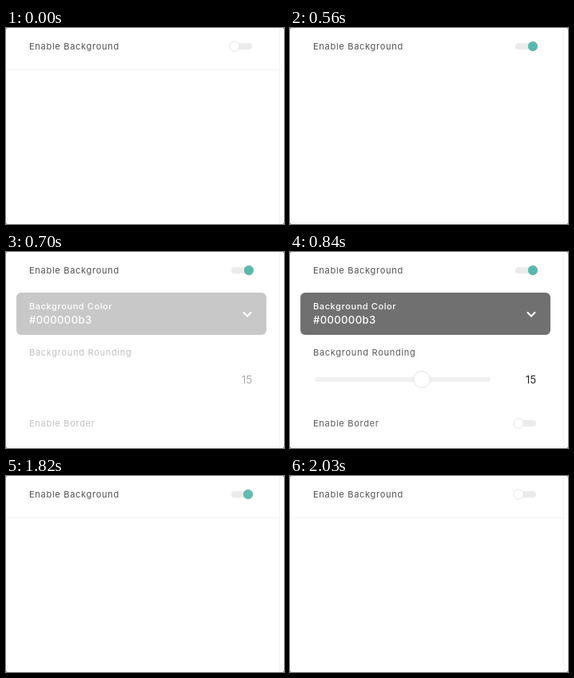
These frames come from a looping animation (348x246 px, 2.38 s). An HTML page with a canvas:

```html
<!DOCTYPE html>
<html lang="en">
<head>
<meta charset="utf-8">
<title>Background settings</title>
<style>
  html, body { margin: 0; width: 100%; height: 100%; overflow: hidden; background: #fff; }
  canvas { display: block; width: 348px; height: 246px; }
</style>
</head>
<body>
<canvas id="stage"></canvas>
<script>
const W = 348, H = 246, LOOP = 2380, TICK = 70;
const OPEN = 420, FADE = 700, CLOSE = 1820;
const TRACK = '#ebebeb', RULE = '#f3f3f3';

const canvas = document.getElementById('stage');
const ctx = canvas.getContext('2d');
const dpr = window.devicePixelRatio || 1;
canvas.width = W * dpr;
canvas.height = H * dpr;
ctx.scale(dpr, dpr);

const mix = (a, b, k) => a + (b - a) * k;
const blend = (a, b, k) => `rgb(${a.map((v, i) => Math.round(mix(v, b[i], k))).join(',')})`;

// Value for each tick after a start time; the last one holds.
const step = (t, start, values) =>
  values[Math.min(values.length - 1, Math.floor((t - start) / TICK))];

function label(str, x, y, { size = 11, weight = 400, color = '#505050', spacing = 0.72, align = 'left' } = {}) {
  ctx.font = `${weight} ${size}px Inter, "Open Sans", sans-serif`;
  ctx.letterSpacing = spacing + 'px';
  ctx.textAlign = align;
  ctx.fillStyle = color;
  ctx.fillText(str, x, y);
}

function box(x, y, w, h, r, fill) {
  ctx.beginPath();
  ctx.roundRect(x, y, w, h, r);
  ctx.fillStyle = fill;
  ctx.fill();
}

function knob(x, y, r, fill, edge) {
  ctx.beginPath();
  ctx.arc(x, y, r, 0, Math.PI * 2);
  ctx.fillStyle = fill;
  ctx.fill();
  ctx.strokeStyle = edge;
  ctx.lineWidth = 0.9;
  ctx.stroke();
}

function toggle(y, on) {
  box(282, y - 4, 26, 8, 4, TRACK);
  knob(mix(286, 304, on), y, mix(6.2, 5.7, on),
    blend([255, 255, 255], [90, 185, 173], on),
    blend([226, 226, 226], [102, 178, 169], on));
}

function switchState(t) {
  if (t < OPEN) return 0;
  if (t < CLOSE) return step(t, OPEN, [0.06, 0.62, 1]);
  return step(t, CLOSE, [0.95, 0.42, 0.06, 0]);
}

function panel(alpha) {
  ctx.globalAlpha = alpha;
  box(13, 51, 313, 53, 6, '#707070');
  label('Background Rounding', 29, 130, { color: '#5a5a5a' });
  label('15', 308.5, 165, { size: 13, color: '#222', spacing: 0.3, align: 'right' });
  label('Enable Border', 29, 219, { color: '#5a5a5a' });

  if (alpha === 1) box(31, 157, 220, 6, 3, '#f0f0f0');
  if (alpha > 0.5) {
    knob(165, 160, 10.3, '#fff', '#dedede');
    toggle(215, 0);
  }

  ctx.globalAlpha = 1;
  label('Background Color', 29, 72, { weight: 500, color: '#fff', spacing: 0.6 });
  label('#000000b3', 29, 90, { size: 13, weight: 500, color: '#fff', spacing: 0.4 });
  ctx.beginPath();
  ctx.moveTo(297, 75.5);
  ctx.lineTo(302, 80.5);
  ctx.lineTo(307, 75.5);
  ctx.strokeStyle = '#fff';
  ctx.lineWidth = 2;
  ctx.stroke();
}

function draw(t) {
  ctx.globalAlpha = 1;
  ctx.fillStyle = '#fff';
  ctx.fillRect(0, 0, W, H);

  const expanded = t >= OPEN && t < CLOSE;
  ctx.fillStyle = RULE;
  ctx.fillRect(342, 0, 1, H);
  ctx.fillRect(0, expanded ? 244 : 52, 342, 1);

  label('Enable Background', 29, 27);
  toggle(23, switchState(t));
  if (t >= FADE && t < CLOSE) panel(step(t, FADE, [0.385, 0.82, 1]));

  ctx.fillStyle = '#8a8a8a';
  for (const x of [0, W - 1])
    for (const y of [0, H - 1]) ctx.fillRect(x, y, 1, 1);
}

const start = performance.now();
function frame() {
  draw((performance.now() - start) % LOOP);
  requestAnimationFrame(frame);
}
frame();
</script>
</body>
</html>
```
